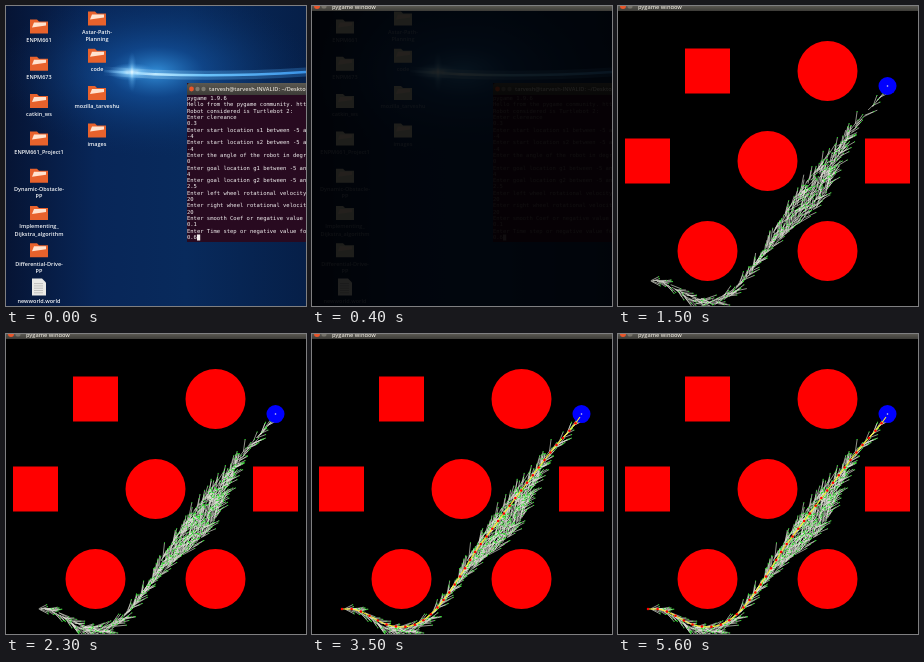
Recreate the animation shown at these times as an HTML page. Size 300 by 300 pixels, loop 6 s.

```html
<!DOCTYPE html>
<html lang="en">
<head>
<meta charset="utf-8">
<title>Path planning</title>
<style>
html, body { margin: 0; width: 100%; height: 100%; overflow: hidden; background: #000; }
svg { display: block; width: 100vw; height: 100vh; }
.label { font: 600 5.5px "Open Sans", sans-serif; fill: #f4f6f8; text-anchor: middle; }
.mono { font: 5.5px "DejaVu Sans Mono", monospace; fill: #f2f0f0; white-space: pre; }
.title { font: 600 5.6px "Open Sans", sans-serif; fill: #dfdbd2; }
.folder { fill: #e8622c; }
.ghost .folder { fill: #d8d8c0; }
.ghost #print, .ghost .label { opacity: .4; }
</style>
</head>
<body>
<svg id="stage" viewBox="0 0 300 300" preserveAspectRatio="none">
  <defs>
    <linearGradient id="sky" x2="1">
      <stop offset="0" stop-color="#061434"/>
      <stop offset=".3" stop-color="#082658"/>
      <stop offset=".6" stop-color="#082a5c"/>
      <stop offset="1" stop-color="#061f48"/>
    </linearGradient>
    <radialGradient id="glow">
      <stop offset="0" stop-color="#3aa0ee" stop-opacity=".85"/>
      <stop offset=".3" stop-color="#1760b4" stop-opacity=".5"/>
      <stop offset="1" stop-color="#0a3068" stop-opacity="0"/>
    </radialGradient>
    <radialGradient id="flare">
      <stop offset="0" stop-color="#f2fdff"/>
      <stop offset=".4" stop-color="#7cccff" stop-opacity=".6"/>
      <stop offset="1" stop-color="#3a90e0" stop-opacity="0"/>
    </radialGradient>
    <linearGradient id="streak" gradientUnits="userSpaceOnUse" x1="95" x2="300" y1="0" y2="0">
      <stop offset="0" stop-color="#58b8ff" stop-opacity="0"/>
      <stop offset=".15" stop-color="#e8fbff"/>
      <stop offset=".5" stop-color="#6cc4fa"/>
      <stop offset="1" stop-color="#3a92e6"/>
    </linearGradient>
    <linearGradient id="bar" x2="0" y2="1">
      <stop offset="0" stop-color="#5a5851"/>
      <stop offset="1" stop-color="#3c3b37"/>
    </linearGradient>
    <clipPath id="edge"><rect x="294" y="80" width="6" height="145"/></clipPath>
  </defs>

  <g id="desktop">
    <rect width="300" height="300" fill="url(#sky)"/>
    <ellipse cx="150" cy="66" rx="160" ry="85" fill="url(#glow)"/>
    <g fill="none" stroke="url(#streak)">
      <path d="M98 65Q190 73 300 66" stroke-width="9" opacity=".3"/>
      <path d="M98 65Q190 73 300 66" stroke-width="2.6"/>
    </g>
    <ellipse cx="126" cy="66" rx="24" ry="9" fill="url(#flare)"/>
    <ellipse cx="126" cy="66" rx="5" ry="20" fill="url(#flare)" opacity=".6"/>
    <g id="icons"></g>
    <rect x="181" y="77" width="119" height="159" fill="#280a20"/>
    <path d="M181 89V80q0-3 3-3H300V89Z" fill="url(#bar)"/>
    <circle cx="185.5" cy="83" r="2.4" fill="#e9562a"/>
    <circle cx="191.5" cy="83" r="2.2" fill="#7d7a70"/>
    <circle cx="197.5" cy="83" r="2.2" fill="#7d7a70"/>
    <text class="title" x="203" y="85">tarvesh@tarvesh-INVALID: ~/Desktop</text>
    <g id="print"><g id="lines" class="mono"></g></g>
  </g>

  <rect id="dim" width="300" height="300"/>
  <use id="rest" href="#lines" clip-path="url(#edge)"/>

  <g id="map">
    <g id="blocks" fill="#f00"></g>
    <path id="edges" fill="none" stroke="#dfe2d6" stroke-width=".65"/>
    <path id="nodes" fill="none" stroke="#25e025"/>
    <circle cx="269.5" cy="80" r="9" fill="#00f"/>
    <circle cx="269.5" cy="80" r=".8" fill="#dde"/>
    <path id="route" fill="none" stroke="#ffee30" stroke-width="1.1"
      d="M30 275H39C58 277 66 293 90 293C118 293 136 262 165 215C190 182 226 134 238 119C246 108 258 98 268 83"/>
    <g id="stops" fill="#f00"></g>
  </g>

  <g id="window">
    <rect width="300" height="5" fill="url(#bar)"/>
    <circle cx="5" cy="0" r="3" fill="#e9562a"/>
    <circle cx="12" cy="0" r="2.6" fill="#77746b"/>
    <text class="title" x="20" y="2.5">pygame window</text>
  </g>
</svg>
<script>
const $ = id => document.getElementById(id);
function add(parent, tag, attrs, text) {
  const el = document.createElementNS("http://www.w3.org/2000/svg", tag);
  for (const k in attrs) el.setAttribute(k, attrs[k]);
  if (text) el.textContent = text;
  parent.appendChild(el);
  return el;
}
const clamp = v => Math.max(0, Math.min(1, v));

let seed = 661;
function rnd() {
  seed = (seed * 1664525 + 1013904223) % 4294967296;
  return seed / 4294967296;
}

// Desktop
function icon(x, y, name, file) {
  const g = $("icons");
  if (file) {
    add(g, "path", { d: `M${x - 7} ${y - 9}h10l4 4v13h-14z`, fill: "#e9e9e6" });
    for (let i = 0; i < 5; i++)
      add(g, "path", { d: `M${x - 5} ${y - 4 + i * 2.3}h9`, stroke: "#a5a5a2", "stroke-width": .6 });
  } else {
    add(g, "path", { d: `M${x - 9} ${y + 7}v-14h7l2 2h9v12z`, class: "folder" });
    add(g, "path", { d: `M${x - 7} ${y + 1}l2-5h12v3z`, fill: "#ffe3cf" });
  }
  name.split("|").forEach((s, i) =>
    add(g, "text", { class: "label", x, y: y + 15.3 + i * 7.3 }, s));
}
["ENPM661", "ENPM673", "catkin_ws", "ENPM661_Project1", "Dynamic-Obstacle-|PP",
 "Implementing_|Dijkstra_algorithm", "Differential-Drive-|PP", "newworld.world"]
  .forEach((name, i) => icon(33, 20.5 + i * 37.3, name, i === 7));
["Astar-Path-|Planning", "code", "mozilla_tarveshu", "images"]
  .forEach((name, i) => icon(91, 12.5 + i * 37.3, name));

const output = `pygame 1.9.6
Hello from the pygame community. https
Robot considered is Turtlebot 2:
Enter clereance
0.3
Enter start location s1 between -5 and
-4
Enter start location s2 between -5 and
-4
Enter the angle of the robot in degree
0
Enter goal location g1 between -5 and
4
Enter goal location g2 between -5 and
2.5
Enter left wheel rotational velocity
20
Enter right wheel rotational velocity
20
Enter smooth Coef or negative value fo
0.1
Enter Time step or negative value for
0.6`;
output.split("\n").forEach((s, i) => add($("lines"), "text", { x: 181, y: 94 + i * 6.32 }, s));
add($("lines"), "rect", { x: 191, y: 228.5, width: 3.2, height: 6 });

// Obstacles sit on a grid, every disc and square given by its cell
const cell = (col, row) => [29.5 + col * 60, 65 + row * 90];
const discs = [cell(3, 0), cell(2, 1), cell(1, 2), cell(3, 2)];
const squares = [cell(1, 0), cell(0, 1), cell(4, 1)];
discs.forEach(([cx, cy]) => add($("blocks"), "circle", { cx, cy, r: 30 }));
squares.forEach(([x, y]) =>
  add($("blocks"), "rect", { x: x - 22.5, y: y - 22.5, width: 45, height: 45 }));

const free = (x, y) =>
  discs.every(([a, b]) => Math.hypot(x - a, y - b) > 30.5) &&
  squares.every(([a, b]) => Math.max(Math.abs(x - a), Math.abs(y - b)) > 23);

// Search tree: edges scattered around the route, wide where the search spread
const route = $("route");
const total = route.getTotalLength();
const hump = (s, mid, width) => Math.exp(-(((s - mid) / width) ** 2));
const fix = v => v.toFixed(1);
const edges = [], nodes = [];
while (edges.length < 720) {
  const s = rnd() * (total - 8);
  const left = .5 + 5 * hump(s, 215, 60);
  const right = 8 * hump(s, 62, 25) + 19 * hump(s, 210, 50) + .5;
  if (rnd() > (left + right) / 25 + .08) continue;
  const p = route.getPointAtLength(s), q = route.getPointAtLength(s + 2);
  const dir = Math.atan2(q.y - p.y, q.x - p.x);
  const off = rnd() * (left + right) - left;
  const x = p.x - Math.sin(dir) * off, y = p.y + Math.cos(dir) * off;
  const turn = dir + (Math.floor(rnd() * 3) - 1) * .42 + (rnd() - .5) * .2;
  const len = 8 + rnd() * 6;
  const ex = x + Math.cos(turn) * len, ey = y + Math.sin(turn) * len;
  if (!free(x, y) || !free(ex, ey)) continue;
  edges.push(`M${fix(x)} ${fix(y)}L${fix(ex)} ${fix(ey)}`);
  nodes.push(`M${fix(ex - .5)} ${fix(ey)}h1`);
}

const GAP = 9.6;
const stops = [];
for (let s = 0; s < total; s += GAP) {
  const p = route.getPointAtLength(s);
  stops.push(add($("stops"), "circle", { cx: fix(p.x), cy: fix(p.y), r: 1.25 }));
}

const show = (el, on) => el.style.display = on ? "" : "none";

function drawTree(t) {
  const count = at => Math.round(edges.length * (1 - (1 - clamp((at - 875) / 1425)) ** 2));
  $("edges").setAttribute("d", edges.slice(0, count(t)).join(""));
  $("nodes").setAttribute("d", nodes.slice(0, count(t - 100)).join(""));
}

function drawRoute(t) {
  const end = total * clamp((t - 2300) / 1000);
  show(route, end > 0);
  route.setAttribute("stroke-dasharray", `${end} ${total + 1}`);
  stops.forEach((el, i) => show(el, end > 0 && i * GAP <= end));
}

// The screen refreshes ten times a second
let last = -1;
function draw(time) {
  const t = Math.floor(time / 100) * 100;
  if (t === last) return;
  last = t;
  const opened = t >= 200;
  show($("desktop"), t < 700);
  $("desktop").classList.toggle("ghost", opened);
  $("dim").setAttribute("opacity", opened ? clamp(.76 + (t - 200) / 2000) : 0);
  show($("rest"), t === 200);
  show($("window"), opened);
  show($("map"), t >= 900);
  drawTree(t);
  drawRoute(t);
}

const begin = performance.now();
function tick() {
  draw((performance.now() - begin) % 6000);
  requestAnimationFrame(tick);
}
tick();
</script>
</body>
</html>
```
